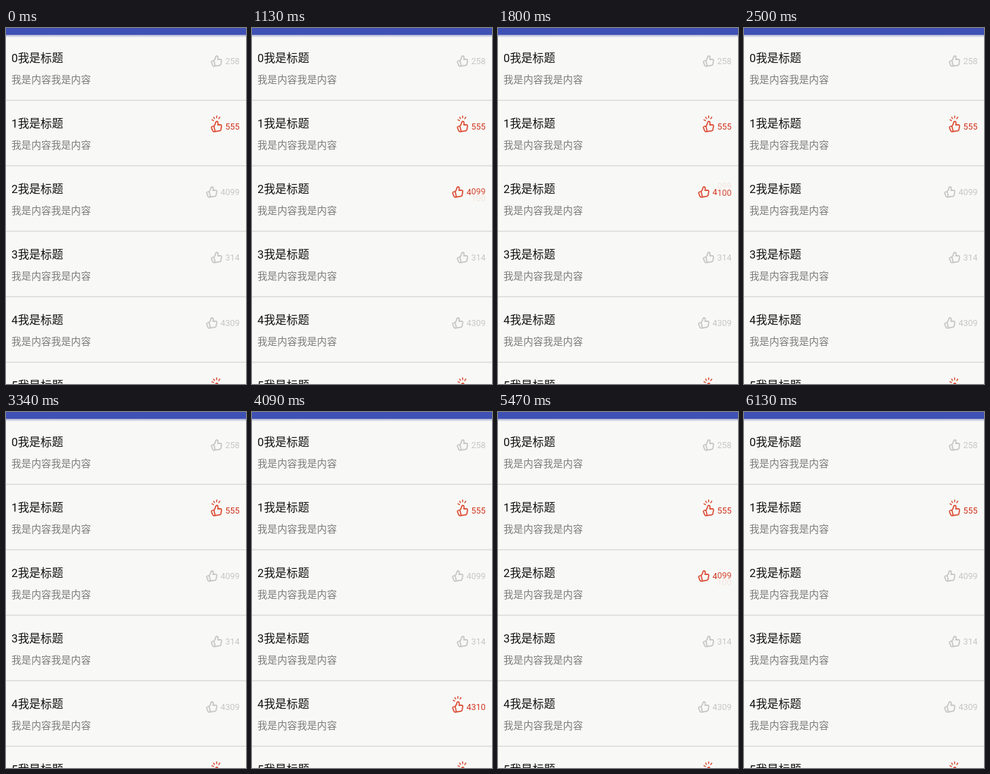
An HTML page with a canvas for the animation above (6.68 s loop, 353x522 px).

```html
<!DOCTYPE html>
<html lang="zh">
<head>
<meta charset="utf-8">
<style>
  html, body { margin: 0; width: 100%; height: 100%; overflow: hidden; background: #f8f9f6; }
  canvas { display: block; }
</style>
</head>
<body>
<canvas id="stage" width="353" height="522"></canvas>
<script>
const ctx = document.getElementById('stage').getContext('2d');
const LOOP = 6680, PITCH = 96;
const GREY = '#c6c7c6', RED = '#cf3520', ICON_RED = '#dc523c';
const TEXT_FONT = 'Roboto, "Noto Sans CJK SC", "Noto Sans CJK", sans-serif';

const thumb = new Path2D(
  'M2.2 8.5 L4.8 7.8 Q7 5.6 7.3 2.8 Q7.5 1 9 1 Q11 1.2 10.9 3.6 L10.6 6' +
  ' L14.2 5.8 Q16.2 5.9 16 8 L15.2 13 Q14.8 14.7 13 14.9 L5 16' +
  ' Q3.6 16.2 3.1 14.8 L1.2 10 Q.9 8.9 2.2 8.5 Z M4.9 7.9 L6.7 15.6');
const rays = new Path2D('M2 -3.4 L4.2 -2.2 M4.6 -7.2 L5.7 -5.2 M8.9 -9 L8.8 -6.4 M13.6 -7.2 L12 -5.1');

const rows = [[258, 259], [554, 555, true], [4099, 4100], [314, 315], [4309, 4310], [721, 722, true]];

// roll: 0 shows the old number, 1 the new one
const stages = {
  off:   { red: false, shine: false, size: 1, roll: 0 },
  press: { red: true, shine: false, size: 1, roll: .1 },
  rise:  { red: true, shine: true, size: .97, roll: .6 },
  land:  { red: true, shine: true, size: 1, roll: 1, pale: true },
  on:    { red: true, shine: true, size: 1, roll: 1 },
  back:  { red: true, shine: false, size: 1, roll: .9 },
  fall:  { red: false, shine: false, size: .93, roll: .4 }
};

const steps = [
  [1130, 2, 'press'], [1250, 2, 'rise'], [1400, 2, 'land'], [1550, 2, 'on'],
  [1800, 2, 'back'], [1950, 2, 'fall'], [2100, 2, 'off'],
  [2650, 3, 'press'], [2770, 3, 'rise'], [2920, 3, 'on'], [3190, 3, 'fall'], [3340, 3, 'off'],
  [3850, 4, 'press'], [3970, 4, 'rise'], [4090, 4, 'on'], [4610, 4, 'fall'], [4760, 4, 'off'],
  [5470, 2, 'press'], [5600, 2, 'rise'], [5750, 2, 'on'], [6010, 2, 'fall'], [6130, 2, 'off']
];

function text(str, x, y, size, color, alpha = 1) {
  ctx.font = `${size}px ${TEXT_FONT}`;
  ctx.fillStyle = color;
  ctx.globalAlpha = alpha;
  ctx.fillText(str, x, y);
  ctx.globalAlpha = 1;
}

function drawIcon(x, y, stage) {
  ctx.save();
  ctx.translate(x + 8.5, y + 8.5);
  ctx.scale(stage.size, stage.size);
  ctx.translate(-8.5, -8.5);
  ctx.strokeStyle = stage.red ? ICON_RED : GREY;
  ctx.lineWidth = 1.8;
  ctx.lineCap = ctx.lineJoin = 'round';
  ctx.stroke(thumb);
  if (stage.shine) {
    ctx.translate(0, 2);
    ctx.lineWidth = 1.6;
    ctx.stroke(rays);
  }
  ctx.restore();
}

function drawCount(from, to, x, y, stage) {
  const before = String(from), after = String(to), { roll, pale } = stage;
  const color = stage.red ? RED : GREY;
  let same = 0;
  while (before[same] === after[same]) same++;
  text(before.slice(0, same), x, y, 12.5, color);
  x += ctx.measureText(before.slice(0, same)).width;
  if (roll < 1) text(before.slice(same), x, y - 10 * roll, 12.5, color, 1 - roll);
  if (roll > 0) text(after.slice(same), x, y + 10 * (1 - roll), 12.5, pale ? GREY : color, roll);
}

function drawRow(i, stage) {
  const top = i * PITCH, [from, to] = rows[i];
  text(i + '我是标题', 8, top + 49.6, 16.7, '#111');
  text('我是内容我是内容', 8, top + 81, 14.6, '#7c7d7b');
  const x = 343.5 - String(to).length * 7.02;
  drawIcon(x - 21.5, top + 40, stage);
  drawCount(from, to, x, top + 53, stage);
  ctx.fillStyle = '#e0e2e0';
  ctx.fillRect(0, top + 105, 353, 2);
}

function draw(now) {
  const t = now % LOOP;
  const current = rows.map(row => row[2] ? 'on' : 'off');
  for (const [start, row, name] of steps) if (t >= start) current[row] = name;

  ctx.fillStyle = '#f8f9f6';
  ctx.fillRect(0, 0, 353, 522);
  rows.forEach((_, i) => drawRow(i, stages[current[i]]));

  const shadow = ctx.createLinearGradient(0, 10, 0, 14);
  shadow.addColorStop(0, '#a9b0d0');
  shadow.addColorStop(1, '#f8f9f6');
  ctx.fillStyle = shadow;
  ctx.fillRect(0, 10, 353, 4);
  ctx.fillStyle = '#3f51b5';
  ctx.fillRect(0, 0, 353, 10);
  requestAnimationFrame(() => draw(performance.now() - origin));
}

const origin = performance.now();
draw(0);
</script>
</body>
</html>
```
